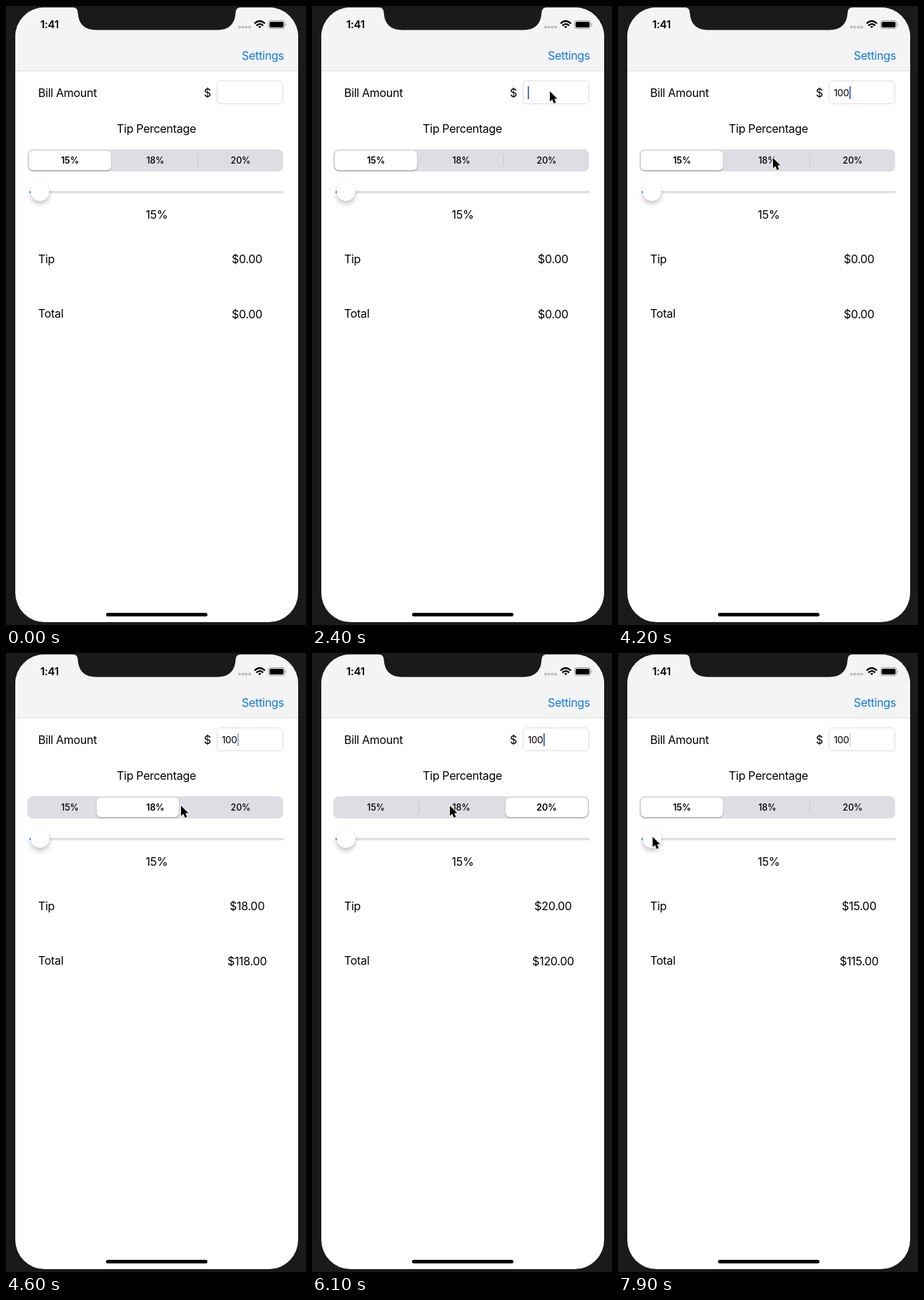
These frames come from a looping animation (420 px wide and 864 px high, 8 s). An HTML page:

```html
<!DOCTYPE html>
<html lang="en">
<head>
<meta charset="utf-8">
<title>Tip calculator</title>
<style>
  html, body { margin: 0; width: 420px; height: 864px; overflow: hidden; background: #1a1a1a; }
  svg { display: block; }
  text { font: 16px Inter, sans-serif; letter-spacing: -.3px; }
  .mid { text-anchor: middle; }
  .segment text { font-size: 12.5px; font-weight: 500; letter-spacing: -.1px; }
  .segment text.on { font-weight: 600; }
</style>
</head>
<body>
<svg width="420" height="864" viewBox="0 0 420 864">
  <defs>
    <clipPath id="screen"><rect x="13" y="2" width="396" height="858" rx="41"/></clipPath>
    <filter id="soft" x="-50%" y="-50%" width="200%" height="200%"><feGaussianBlur stdDeviation="3.5"/></filter>
    <filter id="faint" x="-10%" y="-30%" width="120%" height="160%"><feGaussianBlur stdDeviation="1.2"/></filter>
  </defs>
  <rect width="420" height="864" fill="#1a1a1a"/>
  <g clip-path="url(#screen)">
    <rect width="420" height="864" fill="#fff"/>
    <rect width="420" height="90" fill="#f4f4f4"/>
    <path d="M0 90.5H420" stroke="#dcdcdc"/>
  </g>
  <path d="M94 0V2Q100 2 100.500 9Q102 33.500 126 33.500H296Q320 33.500 321.500 9Q322 2 328 2V0Z" fill="#1a1a1a"/>
  <rect x="140" y="847" width="142" height="5" rx="2.500"/>

  <text x="48" y="31" style="font-size:15px;font-weight:600">1:41</text>
  <g fill="#bdbdbd">
    <circle cx="327" cy="29.500" r="2"/><circle cx="331.700" cy="29.500" r="2"/>
    <circle cx="336.400" cy="29.500" r="2"/><circle cx="341.100" cy="29.500" r="2"/>
  </g>
  <g fill="none" stroke="#000" stroke-width="2.300">
    <path d="M348 24.500Q355 17.500 362.500 24.500M350.500 27.300Q355.200 23 360 27.300"/>
    <path d="M353 28.800Q355.200 27.200 357.500 28.800L355.200 31Z" fill="#000" stroke="none"/>
  </g>
  <rect x="367.500" y="20.500" width="22.500" height="11" rx="3" fill="none" stroke="#999"/>
  <rect x="369" y="22" width="19.500" height="8" rx="1.800"/>
  <path d="M391.300 24Q393.500 26 391.300 28Z" fill="#999"/>

  <text x="330" y="75" fill="#1079e8">Settings</text>
  <text x="45" y="127">Bill Amount</text>
  <text x="277" y="127">$</text>
  <rect x="295.500" y="104.500" width="92" height="32" rx="4.500" fill="#fff" stroke="#dedede"/>
  <text id="bill" x="302" y="126" style="font-size:13.500px;letter-spacing:-.4px"></text>
  <rect id="caret" y="112" width="1.800" height="18" fill="#4262d4"/>
  <text class="mid" x="210.500" y="177">Tip Percentage</text>

  <g class="segment">
    <rect x="30" y="200" width="358" height="31" rx="7.500" fill="#dedde3"/>
    <path class="divider" d="M149.500 208V223" stroke="#c8c7ce"/>
    <path class="divider" d="M268.500 208V223" stroke="#c8c7ce"/>
    <g id="pill">
      <rect y="203.500" width="115" height="27" rx="6" opacity=".22" filter="url(#faint)"/>
      <rect y="202" width="115" height="27" rx="6" fill="#fff"/>
    </g>
    <text class="mid" x="89.500" y="220">15%</text>
    <text class="mid" x="209" y="220">18%</text>
    <text class="mid" x="328.500" y="220">20%</text>
  </g>

  <rect x="33" y="258" width="356" height="3.500" rx="1.700" fill="#e1e1e3"/>
  <rect x="33" y="258" width="10" height="3.500" rx="1.700" fill="#1079e8"/>
  <circle cx="47.500" cy="263" r="13" opacity=".24" filter="url(#soft)"/>
  <circle cx="47.500" cy="259" r="13" fill="#fff"/>
  <text class="mid" x="211" y="297">15%</text>

  <text x="45" y="359">Tip</text>
  <text x="45" y="435">Total</text>
  <text class="mid" id="tip" x="337.500" y="359"></text>
  <text class="mid" id="total" x="337.500" y="436"></text>
  <path id="cursor" d="M0 0V14.500L3.300 11.500L5.700 17L8.500 15.800L6.200 10.500H10.500Z"
        stroke="#fff" stroke-width="1.600" paint-order="stroke"/>
</svg>
<script>
const get = id => document.getElementById(id);
const dividers = document.querySelectorAll('.divider');
const labels = document.querySelectorAll('.segment text');
const LOOP = 8000, STEP = 100, SLIDE = 450;
const percents = [15, 18, 20];
const pillStops = [32, 151, 271];
const caretStops = [302, 309, 316.500, 324];
const taps = [{ at: 4280, to: 1 }, { at: 5075, to: 2 }, { at: 6604, to: 0 }];

// Pointer path: time, x, y
const path = [
  [100, 396, 687], [200, 350, 370], [300, 312, 65], [600, 312, 65],
  [800, 218, 300], [900, 260, 510], [1000, 371, 400], [1300, 333, 128],
  [1700, 333, 128], [2200, 333, 119], [3500, 333, 119], [4200, 217, 212],
  [4300, 217, 212], [4600, 245, 213], [5100, 313, 214], [5400, 315, 217],
  [6100, 193, 213], [6600, 112, 213], [6900, 125, 214], [7100, 122, 215],
  [7800, 49, 256], [8000, 48, 257]
];

const ease = p => (p = Math.min(1, Math.max(0, p)), p * p * (3 - 2 * p));
const mix = (a, b, p) => a + (b - a) * p;
const money = n => '$' + n.toFixed(2);

function pointerAt(t) {
  const i = path.findIndex(point => point[0] > t);
  const [t0, x0, y0] = path[i - 1], [t1, x1, y1] = path[i];
  const p = ease((t - t0) / (t1 - t0));
  return [mix(x0, x1, p), mix(y0, y1, p)];
}

function caretOpacity(t) {
  if (t < 2000) return 0;
  if (t < 3500) return Math.min(1, (t - 1900) / 300);
  const phase = t % 1000;
  return phase < 600 ? 1 : phase < 700 ? .55 : phase < 900 ? 0 : .25;
}

function draw(t) {
  let from = 0, selected = 0, slide = 1;
  for (const { at, to } of taps) {
    if (t - at <= 20) break;
    [from, selected, slide] = [selected, to, ease((t - at) / SLIDE)];
  }
  const pillX = mix(pillStops[from], pillStops[selected], slide);
  get('pill').setAttribute('transform', `translate(${pillX})`);
  dividers.forEach((line, i) => {
    const shown = choice => choice === (i ? 0 : 2) ? 1 : 0;
    line.style.opacity = mix(shown(from), shown(selected), slide);
  });
  const nearest = pillStops.findIndex(x => Math.abs(x - pillX) < 61);
  labels.forEach((label, i) => label.classList.toggle('on', i === nearest));

  const digits = t < 2700 ? 0 : Math.min(3, 1 + Math.floor((t - 2700) / 200));
  get('bill').textContent = '100'.slice(0, digits);
  get('caret').setAttribute('x', caretStops[digits]);
  get('caret').style.opacity = caretOpacity(t);

  const amount = t < taps[0].at + 50 ? 0 : 100;
  const tip = amount * percents[selected] / 100;
  get('tip').textContent = money(tip);
  get('total').textContent = money(amount + tip);

  const visible = t >= path[0][0];
  get('cursor').style.display = visible ? '' : 'none';
  if (visible) get('cursor').setAttribute('transform', `translate(${pointerAt(t)})`);
}

function frame() {
  draw(Math.floor(performance.now() % LOOP / STEP) * STEP);
  requestAnimationFrame(frame);
}
frame();
</script>
</body>
</html>
```
